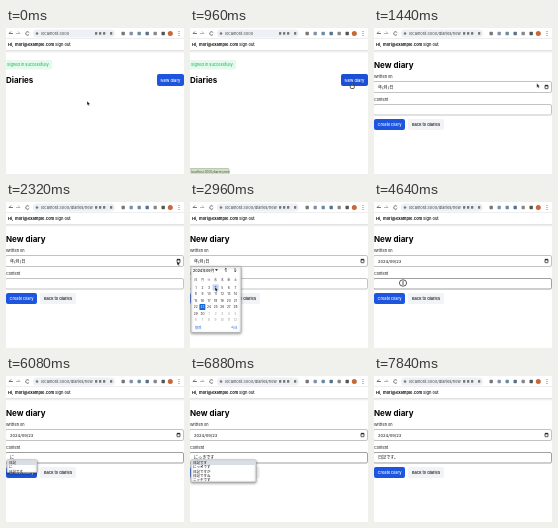
Animation of 178x146 px, one loop 8000 ms. Source, as an HTML page with a canvas:

```html
<!DOCTYPE html>
<html lang="en">
<meta charset="utf-8">
<title>Diary form</title>
<style>
html, body { margin: 0; width: 100%; height: 100%; overflow: hidden; background: #fff }
canvas { display: block }
</style>
<canvas id="stage" width="178" height="146"></canvas>
<script>
const c = document.getElementById('stage').getContext('2d');
const BLUE = '#1d55df', INK = '#111';

function box(x, y, w, h, fill, r = 0, stroke) {
  c.beginPath();
  c.roundRect(x, y, w, h, r);
  if (fill) { c.fillStyle = fill; c.fill(); }
  if (stroke) { c.strokeStyle = stroke; c.lineWidth = .7; c.stroke(); }
}
function text(s, x, y, size = 4, color = INK, weight = 400, align = 'left') {
  c.font = `${weight} ${size}px Inter, "Noto Sans CJK JP", sans-serif`;
  c.fillStyle = color;
  c.textAlign = align;
  c.fillText(s, x, y);
}
function path(points, fill, stroke, width = .7) {
  c.beginPath();
  points.forEach(([x, y]) => c.lineTo(x, y));
  if (fill) { c.closePath(); c.fillStyle = fill; c.fill(); }
  if (stroke) { c.strokeStyle = stroke; c.lineWidth = width; c.stroke(); }
}
function dot(x, y, r, fill) {
  c.beginPath();
  c.arc(x, y, r, 0, 7);
  c.fillStyle = fill;
  c.fill();
}
function panel(x, y, w, h) {
  c.save();
  c.shadowColor = '#0006';
  c.shadowBlur = 3;
  c.shadowOffsetY = 1;
  box(x, y, w, h, '#fff', 1, '#aaa');
  c.restore();
}

function browser(url) {
  box(0, 0, 178, 11, '#fff');
  path([[7, 5.5], [3, 5.5], [5, 3.5]], null, '#444');
  path([[10, 5.5], [14, 5.5], [12, 3.5]], null, '#999');
  c.beginPath();
  c.arc(21.5, 5.5, 1.8, .5, 5.8);
  c.strokeStyle = '#444';
  c.stroke();
  box(27, 1.5, 82, 8, '#edf0f5', 4);
  dot(31, 5.5, 1.3, '#777');
  text(url, 35, 7, 4, '#444');
  for (const x of [89, 93, 97, 104]) box(x, 4, 2.3, 2.8, '#777', .5);
  ['#777', '#8291a8', '#6a8ea0', '#59718c', '#888', '#555'].forEach((color, i) =>
    box(115.5 + i * 8, 3.8, 3.4, 3.4, color, .8));
  dot(164.3, 5.5, 2.5, '#c7683b');
  for (const y of [3.5, 5.5, 7.5]) dot(173, y, .5, '#555');
  box(0, 10.5, 178, .5, '#ddd');
  text('Hi,', 2, 18, 4, INK, 700);
  text('mori@example.com', 9, 18, 4, INK, 700);
  text('Sign out', 49, 18, 4, INK, 500);
  const shade = c.createLinearGradient(0, 22, 0, 25);
  shade.addColorStop(0, '#ddd');
  shade.addColorStop(1, '#fff');
  box(0, 22, 178, 3, shade);
}

function listPage(hover) {
  box(-2, 32, 48, 9.5, '#e4faec', 2);
  text('Signed in successfully.', 1, 38.2, 3.9, '#35b868', 500);
  text('Diaries', 0, 55.3, 8, '#000', 700);
  box(151, 46, 27, 12, hover ? '#1a4fd6' : BLUE, 2);
  text('New diary', 164.5, 53.6, 4.1, '#fff', 500, 'center');
}

function formPage(date, content, focused) {
  text('New diary', 0, 40.3, 8, '#000', 700);
  text('Written on', 0, 50, 3.8);
  box(-.5, 53.5, 178, 11, '#fff', 1.5, '#aaa');
  text(date, 4, 60.7, 4.1);
  box(171, 57.3, 3, 3.4, null, .4, INK);
  box(171, 57.3, 3, 1, INK);
  text('Content', 0, 73, 3.8);
  box(-.5, 76.5, 178, 10.5, '#fff', 1.5, focused ? '#777' : '#aaa');
  text(content, 4, 83.3, 4.1);
  box(0, 91, 31, 11, BLUE, 2);
  text('Create Diary', 15.5, 98, 4, '#fff', 500, 'center');
  box(34, 91, 36, 11, '#f2f3f6', 2);
  text('Back to diaries', 52, 98, 4, INK, 500, 'center');
}

function calendar(p) {
  panel(1, 64.5, 50, 66);
  text('2024年09月', 3, 69.5, 3.7, INK, 500);
  path([[25, 67.3], [28, 67.3], [26.5, 69]], INK);
  path([[36, 70], [36, 66], [34.8, 67.5]], null, '#333');
  path([[45, 66], [45, 70], [46.2, 68.5]], null, '#333');
  const col = i => 5.8 + i * 6.6, row = i => 85.5 + i * 6.5;
  [...'日月火水木金土'].forEach((day, i) => text(day, col(i), 79.3, 3, '#333', 400, 'center'));
  for (let i = 0; i < 42; i++) {
    const x = col(i % 7), y = row(i / 7 | 0);
    const today = i === 22;
    const hover = Math.abs(p.x - x) < 3.3 && Math.abs(p.y - y) < 3.2;
    if (today || hover) box(x - 3, y - 3, 6, 6, today ? '#1766d3' : '#b8d3f5', .8);
    text(i % 30 + 1, x, y + 1.2, 3.2, today ? '#fff' : i < 30 ? '#222' : '#999', 400, 'center');
  }
  text('削除', 5, 127.3, 3.2, '#1766d3');
  text('今日', 41, 127.3, 3.2, '#1766d3');
}

function history(t) {
  panel(6, 88.5, 62, 43);
  if (t >= 4960) box(8, 96, 58, 8, '#eef0f3');
  ['今日はいい天気', '散歩に行きました', '本を読んだ', '早起きした'].forEach((line, i) =>
    text(line, 11, 94.3 + i * 9, 3.7, '#333'));
}

function candidates(width, height, lines) {
  panel(1, 84, width, height);
  lines.forEach((line, i) => {
    if (!i) box(1.5, 84.5, width - 1, 4.5, '#d9dde5');
    text(line, 3, 88 + i * 4.3, 3.5);
  });
}

// time, x, y of the pointer tip
const route = [
  [0, 81, 73], [880, 162, 55], [1280, 162, 55], [2160, 171, 59], [2640, 171, 59],
  [2960, 25, 85], [3080, 25, 85], [3400, 11, 119], [3600, 12, 104],
  [3800, 12, 104], [4560, 29, 81], [8000, 29, 81]
];
function pointerAt(t) {
  const i = route.findIndex(stop => stop[0] > t);
  const [t0, x0, y0] = route[i - 1], [t1, x1, y1] = route[i];
  const u = (t - t0) / (t1 - t0), e = u * u * (3 - 2 * u);
  return { x: x0 + (x1 - x0) * e, y: y0 + (y1 - y0) * e };
}
function pointer({ x, y }, shape) {
  c.save();
  c.translate(x, y);
  if (shape === 'beam') {
    c.beginPath();
    c.ellipse(0, 0, 3.6, 3.2, 0, 0, 7);
    c.strokeStyle = '#333';
    c.lineWidth = .8;
    c.stroke();
    path([[0, -2], [0, 2]], null, INK);
  } else if (shape === 'hand') {
    box(-.6, 0, 1.3, 4, '#fff', .6, INK);
    box(-1.7, 2.3, 4, 3.2, '#fff', 1, INK);
  } else {
    path([[0, 0], [0, 4.3], [1, 3.5], [1.8, 5], [2.5, 4.6], [1.9, 3.2], [3.1, 3.1]], INK, '#fff', .4);
  }
  c.restore();
}

const typing = [
  [0, ''], [5840, 'n'], [5920, 'に'], [6240, 'にっ'], [6320, 'にっk'],
  [6560, 'にっき'], [6720, 'にっきで'], [6880, 'にっきです'],
  [7360, '日記です'], [7600, '日記です。']
];

function draw(t) {
  const p = pointerAt(t);
  const form = t >= 1120, hover = t >= 800 && !form;
  c.clearRect(0, 0, 178, 146);
  browser(form ? 'localhost:3000/diaries/new' : 'localhost:3000');
  if (form) {
    const content = typing.findLast(step => step[0] <= t)[1];
    const composing = t >= 5840 && t < 7360;
    formPage(t < 3840 ? '年/月/日' : '2024/09/23', content, t >= 4640);
    if (composing) box(4, 84, c.measureText(content).width && content.length * 4.1, .5, INK);
    if (t >= 2400 && t < 3840) calendar(p);
    if (t >= 4720 && t < 5840) history(t);
    if (composing && t < 6560) candidates(30, 12.5, ['日記', content || 'に', '日記です']);
    else if (composing) candidates(65, 22, ['日記です', 'にっきです', '日記ですが', '日記ですね', 'ニッキです']);
  } else {
    listPage(hover);
  }
  if (t >= 800 && t < 1360) {
    box(-1, 140.5, 40, 6, '#d3dfc9', 1, '#a9b99e');
    text('localhost:3000/diaries/new', 1, 144.8, 3, '#49543f');
  }
  if (t < 5840) pointer(p, hover ? 'hand' : t >= 4480 ? 'beam' : 'arrow');
}

function frame() {
  draw(Math.floor(performance.now() % 8000 / 80) * 80);
  requestAnimationFrame(frame);
}
frame();
</script>
</html>
```
